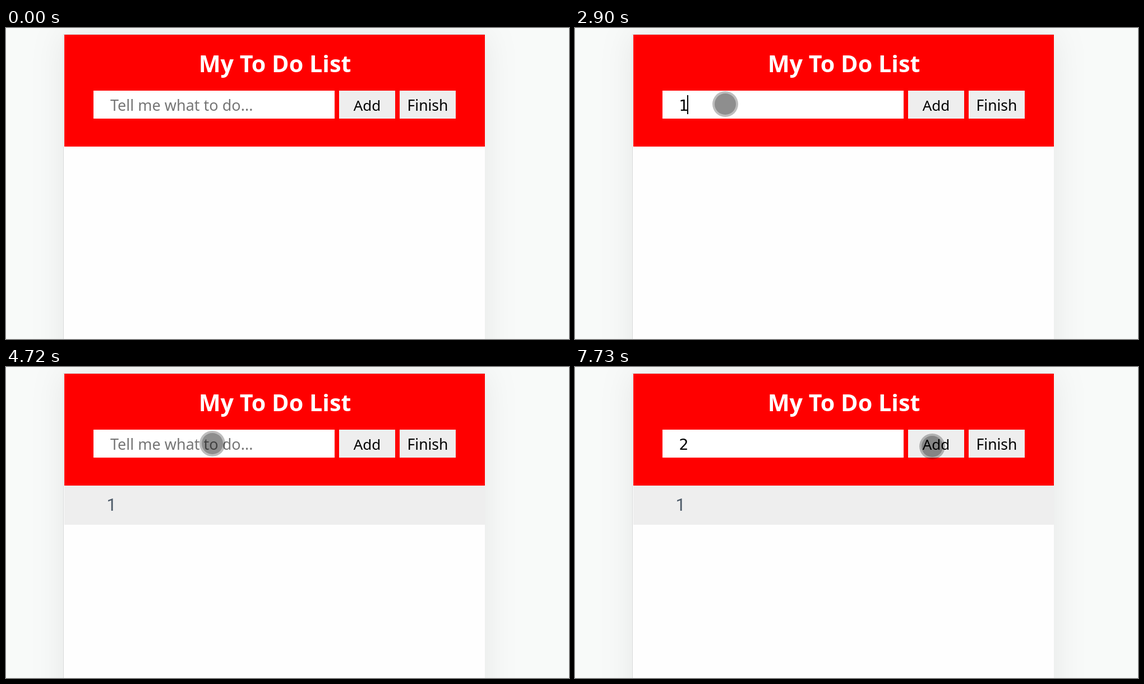
Animation of 1004 by 556 pixels, one loop 7.99 s. Source, as an HTML page:

```html
<!DOCTYPE html>
<html lang="en">
<head>
<meta charset="utf-8">
<title>To do list</title>
<style>
html, body { margin: 0; width: 100%; height: 100%; overflow: hidden; background: #f8faf9; }
svg { display: block; width: 100%; height: 100%; overflow: hidden; }
text { font: 27px "Noto Sans", sans-serif; }
.mid { text-anchor: middle; }
#panel { fill: #fefefe; filter: drop-shadow(0 0 30px rgba(0,0,0,.08)); }
#title { font-size: 41.3px; font-weight: 700; fill: #fff; }
#hint { fill: #757575; }
#typed { font: 26.67px "DejaVu Sans", sans-serif; }
#item text { font: 31px Roboto, sans-serif; fill: #4d5a68; }
</style>
</head>
<body>
<svg>
  <rect id="panel" x="103" y="12" width="751" height="700"/>
  <path d="M102.5 556V11.5H854" fill="none" stroke="#d9dada"/>
  <rect x="104" y="12" width="750" height="200" fill="#f00"/>
  <text id="title" class="mid" x="479.5" y="79">My To Do List</text>
  <rect x="156" y="112" width="430" height="50" fill="#fff"/>
  <path d="M594 112h100v50h-100zM702 112h100v50h-100z" fill="#eee"/>
  <text class="mid" x="644" y="148" style="font-size:26px">Add</text>
  <text class="mid" x="752" y="148" style="font-size:26.5px">Finish</text>
  <text id="hint" x="186" y="148">Tell me what to do...</text>
  <text id="typed" x="185.5" y="148"></text>
  <rect id="caret" y="120" width="2" height="34"/>
  <g id="item">
    <rect x="104" y="212" width="750" height="70" fill="#eee"/>
    <text x="179.5" y="257">1</text>
  </g>
  <g id="pointer">
    <circle r="23" fill-opacity=".26"/>
    <circle r="19" fill-opacity=".25"/>
  </g>
</svg>
<script>
const LOOP = 7990, BLINK = 510, ADDED = 4120, ARRIVED = 1300;
const $ = id => document.getElementById(id);
const show = (id, on) => $(id).setAttribute('visibility', on ? 'visible' : 'hidden');
const latest = (list, t) => list.findLast(e => e.at <= t);

// Each move runs in even steps from a to b, bent by dip pixels downward and bow pixels sideways
const moves = [
  { at: 70, end: 360, steps: 3, a: [672, 498], b: [406, 302] },
  { at: 740, end: 930, steps: 3, a: [495, 367], b: [360, 107] },
  { at: 1110, end: ARRIVED, steps: 3, a: [305, 156], b: [268, 136] },
  { at: 3380, end: 3980, steps: 8, a: [268, 136], b: [620, 147], dip: 37 },
  { at: 4310, end: 4720, steps: 6, a: [620, 147], b: [368, 137], dip: 31 },
  { at: 6230, end: 6580, steps: 5, a: [368, 137], b: [321, 139], bow: 54 },
  { at: 7510, end: 7730, steps: 3, a: [430, 143], b: [637, 142] }
];

// What the input field holds, and whether it has the focus
const edits = [
  { at: 0, text: '' },
  { at: 1610, text: '', focus: true },
  { at: 2900, text: '1', focus: true },
  { at: ADDED, text: '' },
  { at: 6770, text: '', focus: true },
  { at: 7100, text: '2', focus: true }
];

function drawPointer(t) {
  const move = latest(moves, t);
  if (!move) return show('pointer', false);
  const { at, end, steps, a, b, dip = 0, bow = 0 } = move;
  const step = Math.min(steps, Math.round((t - at) / (end - at) * steps));
  const u = step / steps, bend = 4 * u * (1 - u);
  const x = a[0] + (b[0] - a[0]) * u + bow * bend;
  const y = a[1] + (b[1] - a[1]) * u + dip * bend;
  $('pointer').setAttribute('transform', `translate(${x} ${y})`);
  // It flickers until it reaches the field, and hides after typing
  const typing = t >= 7370 && t < 7510;
  show('pointer', !typing && (t >= ARRIVED || step % 2 === 0));
}

function drawField(t) {
  const { at, text, focus } = latest(edits, t);
  $('typed').textContent = text;
  show('hint', !text);
  $('caret').setAttribute('x', text ? 200 : 186);
  show('caret', focus && Math.floor((t - at) / BLINK) % 2 === 0);
}

const start = performance.now();
function tick() {
  const t = (performance.now() - start) % LOOP;
  drawPointer(t);
  drawField(t);
  show('item', t >= ADDED);
  requestAnimationFrame(tick);
}
tick();
</script>
</body>
</html>
```
